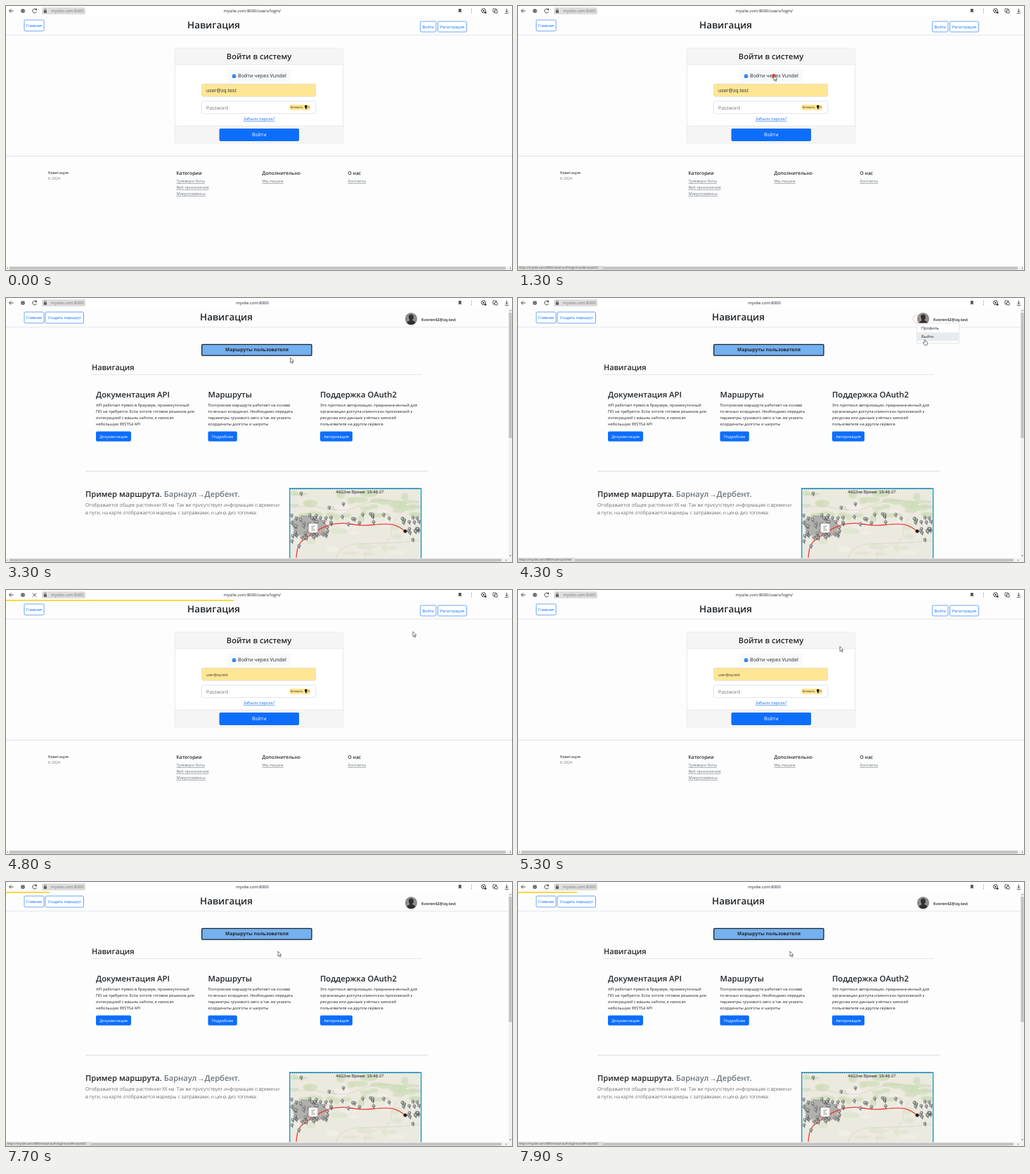
Recreate the animation shown at these times as an HTML page. Size 720 px wide and 377 px high, loop 8 s.

```html
<!DOCTYPE html>
<html lang="ru">
<head>
<meta charset="utf-8">
<title>Навигация</title>
<style>
  html, body { margin: 0; width: 100%; height: 100%; overflow: hidden; background: #fdfdfd; }
  svg { display: block; width: 100%; height: 100%; }
  text { font-family: "Open Sans", "Noto Sans", sans-serif; text-rendering: geometricPrecision; white-space: pre; }
  .plain { font-family: "Liberation Sans", sans-serif; }
</style>
</head>
<body>
<svg id="stage" viewBox="0 0 720 377"></svg>
<script>
const INK = '#212529', BLUE = '#0d6efd', GREY = '#6c757d', LINE = '#dcdfe2';
const stage = document.getElementById('stage');
let layer = stage;

function el(tag, attrs = {}, content = '') {
  const node = document.createElementNS('http://www.w3.org/2000/svg', tag);
  for (const key in attrs) node.setAttribute(key, attrs[key]);
  node.textContent = content;
  layer.append(node);
  return node;
}
function inside(parent, draw) {
  const outer = layer;
  layer = parent;
  const result = draw();
  layer = outer;
  return result;
}
function group(draw) {
  const g = el('g');
  inside(g, draw);
  return g;
}
const rect = (x, y, width, height, fill, more = {}) => el('rect', { x, y, width, height, fill, ...more });
const path = (d, stroke, width = 1, more = {}) =>
  el('path', { d, fill: 'none', stroke, 'stroke-width': width, ...more });
const shape = (d, fill, more = {}) => el('path', { d, fill, ...more });
const dot = (cx, cy, r, fill, more = {}) => el('circle', { cx, cy, r, fill, ...more });
const text = (x, y, size, str, more = {}) =>
  el('text', { x, y, 'font-size': size, fill: INK, ...more }, str);
const centred = (x, y, size, str, more = {}) => text(x, y, size, str, { 'text-anchor': 'middle', ...more });
const heading = { 'font-weight': 600 };
const underlined = { 'text-decoration': 'underline' };

function outlineButton(x, y, w, h, label) {
  rect(x, y, w, h, '#fff', { rx: 1.8, stroke: BLUE, 'stroke-width': 0.6 });
  centred(x + w / 2, y + h / 2 + 2, 5.6, label, { fill: BLUE });
}
function solidButton(x, y, w, h, size, label) {
  rect(x, y, w, h, BLUE, { rx: 2 });
  centred(x + w / 2, y + h / 2 + size * 0.35, size, label, { fill: '#fff' });
}
function scrollbar(x, width) {
  rect(0, 371.6, 720, 5.4, '#f1f1f1');
  rect(x, 372.4, width, 4, '#c1c1c1');
  shape('M2.8 373.2l-1.3 1.2 1.3 1.2z', '#777');
  shape(`M${x + width + 6} 373.2l1.3 1.2-1.3 1.2z`, '#555');
}

function drawLogin() {
  text(258, 32.3, 13.5, 'Навигация', heading);
  outlineButton(589.5, 22, 22.5, 15, 'Войти');
  outlineButton(614.5, 22, 41, 15, 'Регистрация');

  rect(240.3, 60.3, 239.4, 135.6, '#fff', { rx: 1, stroke: LINE, 'stroke-width': 0.7 });
  rect(240.6, 60.6, 238.8, 23, '#f5f5f5');
  rect(240.6, 171.4, 238.8, 24.2, '#f5f5f5');
  path('M240 83.7H480M240 171.2H480', LINE, 0.6);
  centred(360, 75.5, 11.1, 'Войти в систему', heading);

  rect(315, 91, 90, 17.5, '#f8f9fa', { rx: 2 });
  dot(324.5, 100.2, 2.9, '#4285f4');
  text(330, 102.4, 7.2, 'Войти через Vundel');

  const field = { rx: 2, stroke: '#ced4da', 'stroke-width': 0.6 };
  rect(278.6, 111.3, 162.2, 18, '#ffe695', field);
  rect(278.6, 135.6, 162.2, 18, '#fff', field);
  text(285, 147.5, 6.9, 'Password', { fill: GREY });
  rect(403.5, 141, 29.5, 7.4, '#ffe58a', { rx: 1 });
  text(405, 146.2, 4, 'Вставить');
  dot(426.8, 143.4, 1.9, '#111');
  rect(426, 144, 1.7, 3.2, '#111');
  path('M429.6 143.9l1.2 1.2 1.2-1.2', '#111', 0.7);
  centred(360, 163, 5.6, 'Забыли пароль?', { fill: BLUE, ...underlined });
  solidButton(303.5, 175, 113.5, 18, 6.9, 'Войти');

  path('M0 214.5H720', LINE, 0.8);
  text(59.5, 240, 5.55, 'Навигация');
  text(59.5, 248, 5.2, '© 2024', { fill: GREY });
  [[242.5, 'Категории', 'Тулеворн боты', 'Веб-приложения', 'Микросервисы'],
   [364.5, 'Дополнительно', 'Мы пишем'],
   [486.5, 'О нас', 'Контакты']].forEach(([x, title, ...links]) => {
    text(x, 240.6, 6.75, title, heading);
    links.forEach((link, i) => text(x, 252 + 9 * i, 5.6, link, { fill: GREY, ...underlined }));
  });
  scrollbar(5, 706);
}

function drawMap() {
  let seed = 11;
  const random = () => (seed = (seed * 16807) % 2147483647) / 2147483647;
  const spread = (a, b) => a + random() * (b - a);
  const scatter = (count, left, right, top, bottom, draw) => {
    for (let i = 0; i < count; i++) draw(spread(left, right), spread(top, bottom));
  };
  const patch = (fill, opacity) => (cx, cy) =>
    el('ellipse', { cx, cy, rx: spread(4, 13), ry: spread(2, 6), fill, opacity });
  const pin = (x, y) => {
    path(`M${x} ${y}l.8 4`, '#444', 0.8);
    dot(x, y, 2.1, '#8c8c8c', { stroke: '#606060', 'stroke-width': 0.5 });
    dot(x - 0.4, y - 0.4, 0.9, '#ddd');
  };
  rect(403, 271.5, 188, 101, '#ece9df');
  scatter(34, 410, 583, 278, 318, patch('#cfddb9', 0.75));
  scatter(14, 410, 583, 285, 365, patch('#f3efe8', 0.8));
  scatter(10, 410, 583, 325, 366, patch('#dbe5cb', 0.6));
  path('M404 300C440 290 470 312 500 298S560 286 590 302M470 371C480 340 520 356 590 346', '#c9c4ba', 0.5);
  path('M510 372C514 345 545 362 548 335S570 302 590 290', '#d4c6cd', 0.5);
  shape('M406 318l15-8 16 2 12 5 8 7-5 13-12 6-14-5-14 2z', '#8a8a8a', { opacity: 0.6 });
  path('M413 371C414 358 416 350 424 345C436 337 446 328 458 325C470 321 482 321 492 323' +
    'S512 325 522 324S545 322 552 324S562 328 568 333', '#e8413a', 1.3);
  scatter(46, 406, 458, 310, 343, pin);
  scatter(14, 456, 552, 308, 324, pin);
  scatter(18, 564, 588, 313, 338, pin);
  [[420, 279], [460, 299], [480, 294], [407, 347], [417, 354], [522, 309], [579, 345]].forEach(p => pin(...p));
  dot(568, 333, 2.5, '#222');
  rect(430.5, 322, 13, 13, '#fff', { rx: 2, stroke: '#aaa', 'stroke-width': 0.5 });
  path('M434.5 326h5M434.5 328.6h3M434.5 331.2h5', '#555', 0.8);
  rect(403.7, 272.2, 187, 101, 'none', { stroke: '#1fa3d1', 'stroke-width': 1.5 });
  path('M404 272.2H590', '#176e94', 1.2, { 'stroke-dasharray': '1.5 1.5' });
  centred(503.5, 279.4, 6.2, '4632км Время: 16:48:27', { class: 'plain' });
}

function drawHome() {
  text(276, 32.3, 13.5, 'Навигация', heading);
  outlineButton(56, 20, 54.5, 16, 'Создать маршрут');
  dot(576.5, 29.7, 8.6, '#8d8d8d');
  shape('M570.2 35.6c1-3 4-2.6 4.6-4.2-3-3.5-2-8 1.7-8s4.7 4.5 1.7 8c.6 1.6 3.6 1.2 4.6 4.2a8.6 8.6 0 0 1-12.6 0z', '#303030');
  text(591, 33, 5.7, 'Kvoren42@zq.test', heading);

  rect(278.7, 66.4, 156.3, 15.8, '#75b0ef', { rx: 1, stroke: '#17202c', 'stroke-width': 1.3 });
  centred(357, 75.8, 6.75, 'Маршруты пользователя', { 'font-weight': 700 });
  text(122, 103.4, 10.9, 'Навигация', heading);
  path('M122 109.5H592', LINE, 0.7);

  [[128, 50, 'Документация API', 'Документация',
    ['API работает прямо в браузере, промежуточный', 'ПО не требуется. Если хотите готовое решение для',
     'интеграцией с вашим сайтом, я написал', 'небольшую RESTful API']],
   [287.5, 41.3, 'Маршруты', 'Подробнее',
    ['Построение маршрута работает на основе', 'точечных координат. Необходимо передать',
     'параметры грузового авто а так же указать', 'координаты долготы и широты']],
   [447, 46, 'Поддержка OAuth2', 'Авторизация',
    ['Это протокол авторизации, предназначенный для', 'организации доступа клиентских приложений к',
     'ресурсам или данным учётных записей', 'пользователя на другом сервисе.']]
  ].forEach(([x, width, title, label, lines]) => {
    text(x, 142.4, 11.3, title, heading);
    lines.forEach((line, i) => text(x, 155 + 9.1 * i, 5.6, line));
    solidButton(x, 190.5, width, 14.3, 5.6, label);
  });

  path('M113 247.2H601', '#d3d3d3', 0.8);
  const feature = text(113, 283.6, 11.2, 'Пример маршрута. ', heading);
  inside(feature, () => el('tspan', { fill: GREY }, 'Барнаул→Дербент.'));
  ['Отображается общее растоянии XX км. Так же присутствует информация о времени',
   'в пути, на карте отображается маркеры с заправками, и цена диз топлива.'
  ].forEach((line, i) => text(113, 297.6 + 11.3 * i, 7.03, line, { 'font-weight': 300 }));
  drawMap();

  rect(715, 14.5, 5, 357.5, '#f1f1f1');
  rect(715.6, 21, 4, 179, '#c1c1c1');
  shape('M716.3 18.5l1.3-1.5 1.3 1.5z', '#777');
  shape('M716.3 367.5l1.3 1.5 1.3-1.5z', '#555');
  scrollbar(5, 700);
}

function drawBrowser() {
  rect(0, 0, 720, 14, '#fff');
  path('M10.5 7H4.8M7.3 4.3L4.6 7l2.7 2.7', '#333', 0.9);
  dot(24, 7, 3, '#777');
  rect(51, 2, 62, 10, '#dedede', { rx: 1.5 });
  rect(53.8, 6.2, 4, 3.6, '#555');
  path('M54.6 6.2v-1a1.2 1.2 0 0 1 2.4 0v1', '#555', 0.7);
  text(64, 9.1, 5.9, 'mysite.com:8000', { fill: '#777' });
  shape('M644 4h3.8v5.8l-1.9-1.5-1.9 1.5z', '#555');
  [4.6, 7, 9.4].forEach(y => dot(662.5, y, 0.5, '#555'));
  dot(679.5, 6.7, 3, 'none', { stroke: '#222', 'stroke-width': 0.9 });
  shape('M678.6 5.2l2.6 1.5-2.6 1.5zM681 8.5h2.5v2h-2.5z', '#222');
  path('M693 4h4.5v2M693 4v4.5h2M695.5 6h3.5v4h-3.5z', '#333', 0.8);
  path('M712.5 3.8v4.7M710.5 6.7l2 2 2-2M709.8 10.3h5.4', '#333', 0.8);
  path('M0 41.5H720', LINE, 0.7);
  outlineButton(26, 20, 28, 15.8, 'Главная');
}

rect(0, 0, 720, 377, '#fdfdfd');
drawBrowser();
const reload = path('M43 5.2A2.9 2.9 0 1 0 43.4 8M43.5 3.4v2.2h-2.2', '#333', 0.9);
const stop = path('M38 4.5l5 5M43 4.5l-5 5', '#333', 0.9);
const address = centred(350.5, 9.1, 5.9, '');
const login = group(drawLogin);
const email = inside(login, () => text(285, 123.3, 7.1, 'user@zq.test'));
const home = group(drawHome);
const bar = rect(0, 14, 0, 1.5, '#ffcc00');
const ring = dot(567.5, 30, 5.5, 'none', { stroke: '#eab09c', 'stroke-width': 0.7 });

let hover, statusBox, statusText;
const menu = group(() => {
  rect(567.6, 36, 60.3, 28.5, '#fff', { rx: 1.5, stroke: '#d3d5d7', 'stroke-width': 0.6 });
  hover = rect(568, 49, 59.6, 12.3, '#e9ecef');
  text(574, 45.2, 5.6, 'Профиль');
  text(574, 57.2, 5.6, 'Выйти');
});
const status = group(() => {
  statusBox = rect(0, 371, 121, 6, '#dcdcdc');
  statusText = text(1.5, 375.4, 4.2, '', { fill: '#444' });
});
const click = dot(0, 0, 2.8, '#e5383b', { opacity: 0.8 });
const outline = { fill: '#fff' };
const arrow = path('M0 0v7l1.6-1.4 1.1 2.5 1.1-.5-1.1-2.4h2.2z', '#222', 0.6, outline);
const hand = path('M0 0c-.8 0-.8 1-.8 1v3.4l-1-.8c-.8 0-1 .6-.7 1l2.1 3.2h3.4l.8-3.8c0-.9-2-1.2-3-1.5V1S.8 0 0 0z', '#222', 0.6, outline);

// [time, x, y]
const CURSOR = [[400, 536, 71], [700, 462, 86], [1100, 364, 99.5], [3200, 364, 99.5], [3700, 567, 29],
  [3900, 567, 29], [4200, 579, 59.5], [4800, 579, 59.5], [5300, 458, 80.5], [5900, 458, 80.5],
  [6600, 387, 89.5], [6800, 387, 89.5], [7100, 387, 99]];
// [time, width]
const PROGRESS = [[1600, 0], [2300, 127], [2800, 720], [2899, 720], [2900, 0], [4599, 0], [4600, 60],
  [5100, 720], [5199, 720], [5200, 0], [7100, 0], [7700, 62], [7900, 84]];

const within = (t, ...spans) => spans.some(([a, b]) => t >= a && t < b);
const show = (node, on) => { node.style.display = on ? '' : 'none'; };

function sample(track, t, column) {
  const next = track.findIndex(key => key[0] > t);
  if (next === 0) return track[0][column];
  if (next < 0) return track[track.length - 1][column];
  const a = track[next - 1], b = track[next];
  return a[column] + (b[column] - a[column]) * (t - a[0]) / (b[0] - a[0]);
}

function render(now) {
  const t = Math.floor((now % 8000) / 100) * 100;
  const isHome = within(t, [2300, 4700], [7700, 8000]);
  const loading = within(t, [1500, 2300], [4600, 4900], [7100, 7700]);
  show(home, isHome);
  show(login, !isHome);
  show(reload, !loading);
  show(stop, loading);
  address.textContent = 'mysite.com:8000' + (isHome ? '' : '/users/login/');
  email.setAttribute('font-size', within(t, [4700, 5600]) ? 5.1 : 7.1);
  bar.setAttribute('width', sample(PROGRESS, t, 1));

  show(menu, within(t, [3900, 4700]));
  show(ring, within(t, [3800, 4700]));
  hover.setAttribute('y', t < 4200 ? 37.5 : 49);

  const profile = within(t, [4100, 4700]);
  show(status, profile || within(t, [1300, 2900], [6900, 8000]));
  statusBox.setAttribute('width', profile ? 81 : 121);
  statusText.textContent = 'https://mysite.com:8000/' +
    (profile ? 'users/profile/' : 'social-auth/login/vundel-oauth2/');

  const x = sample(CURSOR, t, 1), y = sample(CURSOR, t, 2);
  [arrow, hand, click].forEach(node => node.setAttribute('transform', `translate(${x} ${y})`));
  const pointing = within(t, [4000, 4700]);
  show(arrow, t >= 400 && !pointing);
  show(hand, pointing);
  show(click, within(t, [1300, 1600], [3800, 4000], [4500, 4700], [7100, 7400]));
}

const start = performance.now();
function tick() {
  render(performance.now() - start);
  requestAnimationFrame(tick);
}
tick();
</script>
</body>
</html>
```
